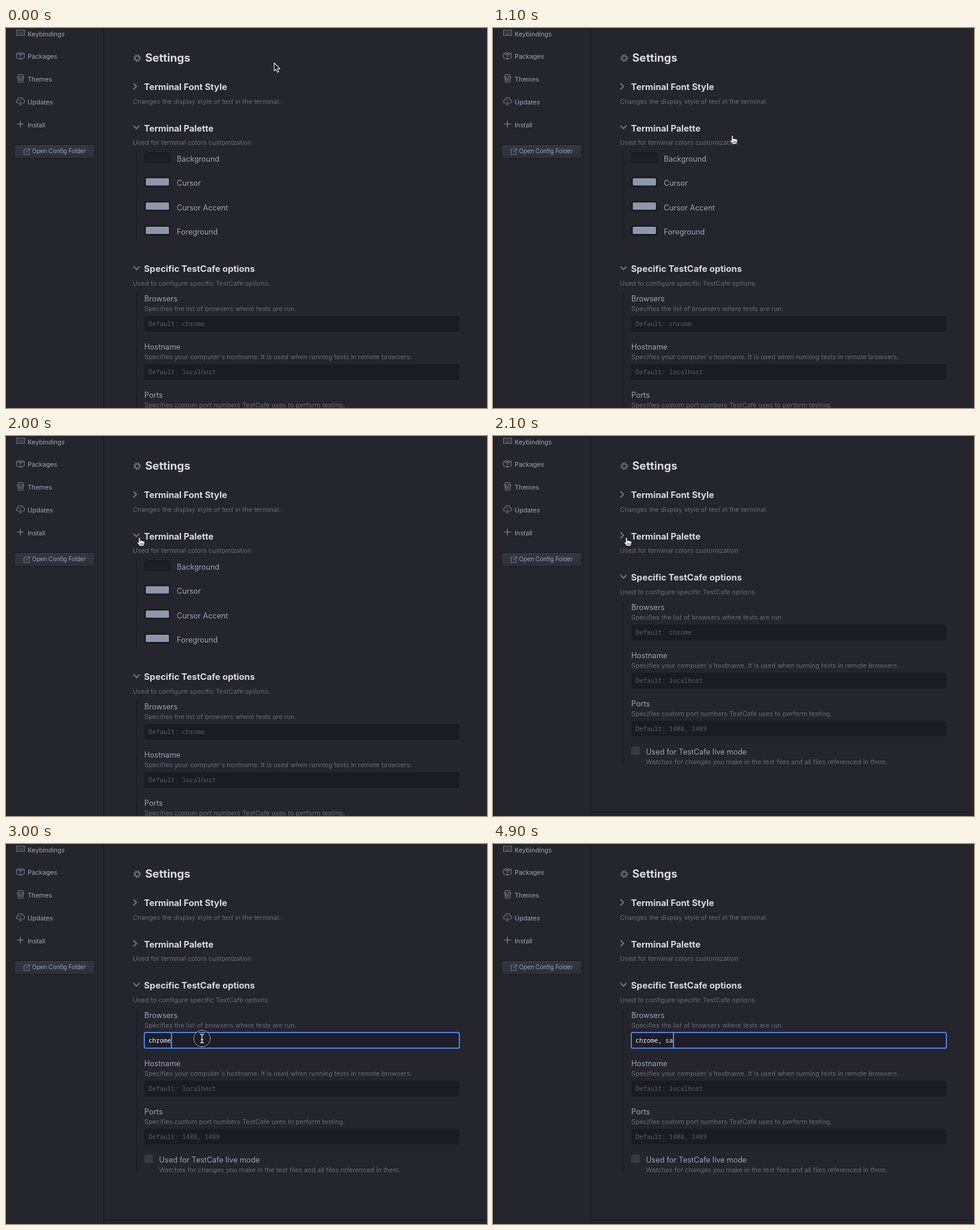
Write an HTML page that moves like this. It is 800x631 px and loops after 5000 ms.

```html
<!DOCTYPE html>
<html lang="en">
<head>
<meta charset="utf-8">
<title>Settings</title>
<style>
  html, body { margin: 0; width: 100%; height: 100%; overflow: hidden; background: #24252d; }
  svg { display: block; width: 800px; height: 631px; }
  text { font-family: Inter, "Open Sans", sans-serif; white-space: pre; }
  .title { font-size: 18.5px; font-weight: 700; fill: #d9dae2; }
  .heading { font-size: 14.7px; font-weight: 700; fill: #d9dae2; }
  .label { font-size: 12.5px; fill: #9fa5b3; }
  .note { font-size: 10.82px; fill: #696c77; }
  .nav { font-size: 10.65px; fill: #9fa5b3; }
  .button { font-size: 9.67px; fill: #9fa5b3; }
  .hint, .value { font-family: "Noto Sans Mono", "DejaVu Sans Mono", monospace; font-size: 10.4px; }
  .hint { fill: #595c68; }
  .value { fill: #f2f4f8; }
  .icon { fill: none; stroke: #737782; stroke-width: 1.1; stroke-linejoin: round; }
  .chevron { fill: none; stroke: #737782; stroke-width: 1.9; }
  .rule { fill: none; stroke: #191a20; }
</style>
</head>
<body>
<svg viewBox="0 0 800 631">
  <defs>
    <linearGradient id="buttonFill" x2="0" y2="1">
      <stop stop-color="#333742"/><stop offset="1" stop-color="#2c303a"/>
    </linearGradient>
  </defs>
  <rect width="800" height="631" fill="#24252d"/>
  <path class="rule" d="M.5 0V631M162.5 0V631"/>

  <g id="sidebar">
    <g class="icon">
      <path d="M17.5 3.5H31V12.5H17.5ZM20 10.3H28.5"/>
      <path d="M19.5 6H29.5M19.5 8.2H29.5" stroke-dasharray="1.2 1"/>
      <path d="M17.5 42.6L24 40.5L30.5 42.6V49.5L24 52L17.5 49.5ZM17.5 42.6L24 45L30.5 42.6M24 45V52M20.5 41.6L27.2 43.8"/>
      <path d="M19.5 81C19.5 75.8 29 75.8 29 81M19 81H29.5V83.5H19ZM20 83.5L20.6 90H28L28.5 83.5M22 83.5V87H24V85.5H26V88"/>
      <path d="M21 124.5H19.8C16.5 124.2 16.7 119.8 20 119.6C20.5 114.5 27.5 114.3 28.2 118.8C31.8 118.7 32 124.2 28.3 124.5H27M24 119.5V127.5M21.5 125L24 127.7L26.5 125"/>
      <path d="M24 154V165M18.5 159.5H29.5" stroke-width="1.6"/>
    </g>
    <rect x="14.5" y="193.5" width="133" height="23" rx="2" fill="url(#buttonFill)" stroke="#181a1f"/>
    <path class="icon" d="M34 201H30V210H38.5V206M33.5 206.5L39 201M35.5 200.5H39.5V204.5"/>
  </g>

  <g id="page">
    <g fill="none" stroke="#686b76">
      <circle cx="218.3" cy="50" r="3.6" stroke-width="2.2"/>
      <circle cx="218.3" cy="50" r="5.5" stroke-width="2" stroke-dasharray="2.2 2.12"/>
    </g>
    <path class="chevron" d="M212 92L217 97L212 102"/>
    <path class="chevron" id="paletteChevron"/>
  </g>
  <g id="palette"><path class="rule" d="M217 206V352"/></g>
  <g id="options">
    <path class="chevron" d="M212 231L217 236L222 231"/>
    <path class="rule" d="M217 275V548M163 624.5H800"/>
    <rect x="230" y="515.5" width="14.5" height="14" rx="2" fill="#373a45"/>
  </g>

  <g id="focus">
    <rect x="230" y="313" width="524" height="26" rx="2.5" fill="#1c1d29" stroke="#4b81ea" stroke-width="2"/>
    <text class="value" id="typed" x="237" y="329.7"></text>
    <rect id="caret" y="313" width="2" height="25" fill="#568af2"/>
  </g>

  <g id="pointer">
    <g id="ring" fill="none">
      <circle stroke="#c8cad0"/>
      <circle stroke="#15161a" stroke-width="1.2"/>
    </g>
    <path id="arrow" d="M0 0V13.2L3.1 10.4L5.2 15.4L7.6 14.4L5.5 9.6H9.6Z" fill="#111216" stroke="#f4f4f4" stroke-width="1.1" stroke-linejoin="round"/>
    <g id="hand" stroke-linejoin="round" stroke-linecap="round">
      <path d="M-1.3 .9C-1.3 -.8 1.3 -.8 1.3 .9V5C2 4 3.6 4.3 3.8 5.4C4.6 4.6 6 5 6.2 6.1C7.2 5.5 8.4 6 8.5 7.2C8.7 9.5 7.8 11 7.2 13.8H.2C-.7 11.7 -2.5 10.3 -3.6 8.5C-4.2 7.2 -2.6 6.4 -1.3 8Z" fill="#fff" stroke="#15161a" stroke-width=".9"/>
      <path d="M2 9V11.8M4.1 9V11.8M6.1 9V11.8" stroke="#15161a" stroke-width=".8"/>
    </g>
    <g id="beam" fill="none">
      <path d="M-3.2 -7.2Q0 -7.2 0 -5Q0 -7.2 3.2 -7.2M0 -5V5M-3.2 7.2Q0 7.2 0 5Q0 7.2 3.2 7.2M-1.8 2H1.8" stroke="#111216" stroke-width="2.8"/>
      <path d="M-3.2 -7.2Q0 -7.2 0 -5Q0 -7.2 3.2 -7.2M0 -5V5M-3.2 7.2Q0 7.2 0 5Q0 7.2 3.2 7.2M-1.8 2H1.8" stroke="#f4f4f4" stroke-width="1.3"/>
    </g>
  </g>
</svg>
<script>
const $ = id => document.getElementById(id);
const NS = 'http://www.w3.org/2000/svg';

function add(parent, tag, attrs, content = '') {
  const node = document.createElementNS(NS, tag);
  for (const key in attrs) node.setAttribute(key, attrs[key]);
  node.textContent = content;
  $(parent).append(node);
}
const write = (parent, kind, x, y, content) => add(parent, 'text', { class: kind, x, y }, content);
const box = (parent, x, y, width, height, rx, fill) => add(parent, 'rect', { x, y, width, height, rx, fill });

['Keybindings', 'Packages', 'Themes', 'Updates', 'Install'].forEach((name, i) =>
  write('sidebar', 'nav', 36, 13.6 + i * 37.75, name));
write('sidebar', 'button', 43.5, 208, 'Open Config Folder');

write('page', 'title', 231.5, 55.8, 'Settings');
write('page', 'heading', 229.5, 103.4, 'Terminal Font Style');
write('page', 'note', 211, 125.9, 'Changes the display style of text in the terminal.');
write('page', 'heading', 229.5, 171.8, 'Terminal Palette');
write('page', 'note', 211, 194.2, 'Used for terminal colors customization');

['Background', 'Cursor', 'Cursor Accent', 'Foreground'].forEach((name, i) => {
  const y = 206.6 + i * 40.3;
  box('palette', 230, y, 43, 17.4, 3, '#191a1e');
  if (i) box('palette', 232.5, y + 2.6, 38.5, 12, 1.5, '#8f97ac');
  else box('palette', 231, y + 1, 41, 15.4, 2, '#1e1f23');
  write('palette', 'label', 284, 221.9 + i * 40.5, name);
});

// The options section is laid out for the folded palette.
write('options', 'heading', 229.5, 240.1, 'Specific TestCafe options');
write('options', 'note', 211, 262.7, 'Used to configure specific TestCafe options.');
[
  ['Browsers', 'Specifies the list of browsers where tests are run.', 'chrome'],
  ['Hostname', 'Specifies your computer`s hostname. It is used when running tests in remote browsers.', 'localhost'],
  ['Ports', 'Specifies custom port numbers TestCafe uses to perform testing.', '1488, 1489']
].forEach(([name, note, preset], i) => {
  const y = i * 80;
  write('options', 'label', 230, y + 288.6, name);
  write('options', 'note', 230, y + 304.8, note);
  box('options', 230, y + 313, 524, 26, 2.5, '#1b1c23');
  write('options', 'hint', 237, y + 329.7, 'Default: ' + preset);
});
write('options', 'label', 254.5, 528.5, 'Used for TestCafe live mode');
write('options', 'note', 254.5, 544.9, 'Watches for changes you make in the test files and all files referenced in them.');

const LOOP = 5000, FOLD = 2100, FOCUS = 3000, CHAR = 6.24;

// time, x, y, shape
const pointerSteps = [
  [0, 446, 58, 'arrow'], [600, 445, 62, 'arrow'], [700, 440, 84, 'arrow'],
  [800, 428, 119, 'arrow'], [900, 414, 151, 'arrow'], [1000, 403, 172, 'hand'],
  [1100, 398, 179, 'hand'], [1200, 388, 177, 'hand'], [1300, 345, 172, 'hand'],
  [1400, 275, 166, 'hand'], [1500, 226, 164, 'hand'], [1600, 212, 166, 'hand'],
  [1700, 222, 169, 'hand'], [2400, 222, 204, 'arrow'], [2500, 222, 266, 'arrow'],
  [2600, 242, 298, 'arrow'], [2700, 288, 318, 'beam'], [2800, 314, 322, 'beam'],
  [2900, 326, 323, 'beam'], [3900, 326, 323, 'none']
];
const ringSteps = [[0, 0], [1900, 28], [2000, 0], [3000, 13.6], [3100, 0]];
const textSteps = [[0, 'chrome'], [3900, 'chrome,'], [4500, 'chrome, '], [4700, 'chrome, s'], [4900, 'chrome, sa']];
const caretSteps = [[0, true], [3200, false], [3700, true], [4400, false], [4500, true]];

const at = (steps, t) => steps.findLast(step => step[0] <= t);
const show = (id, on) => { $(id).style.display = on ? '' : 'none'; };

function draw(t) {
  const folded = t >= FOLD;
  show('palette', !folded);
  $('paletteChevron').setAttribute('d', folded ? 'M212 160L217 165L212 170' : 'M212 162L217 167L222 162');
  $('options').setAttribute('transform', `translate(0 ${folded ? 0 : 165})`);

  const typed = at(textSteps, t)[1];
  show('focus', t >= FOCUS);
  show('caret', at(caretSteps, t)[1]);
  $('typed').textContent = typed;
  $('caret').setAttribute('x', 236.8 + typed.length * CHAR);

  const [, x, y, shape] = at(pointerSteps, t);
  $('pointer').setAttribute('transform', `translate(${x} ${y})`);
  for (const id of ['arrow', 'hand', 'beam']) show(id, id === shape);

  const radius = at(ringSteps, t)[1];
  show('ring', radius > 0);
  $('ring').children[0].setAttribute('r', radius);
  $('ring').children[1].setAttribute('r', Math.max(0, radius - 1.2));
}

const start = performance.now();
function tick() {
  draw((performance.now() - start) % LOOP);
  requestAnimationFrame(tick);
}
tick();
</script>
</body>
</html>
```
